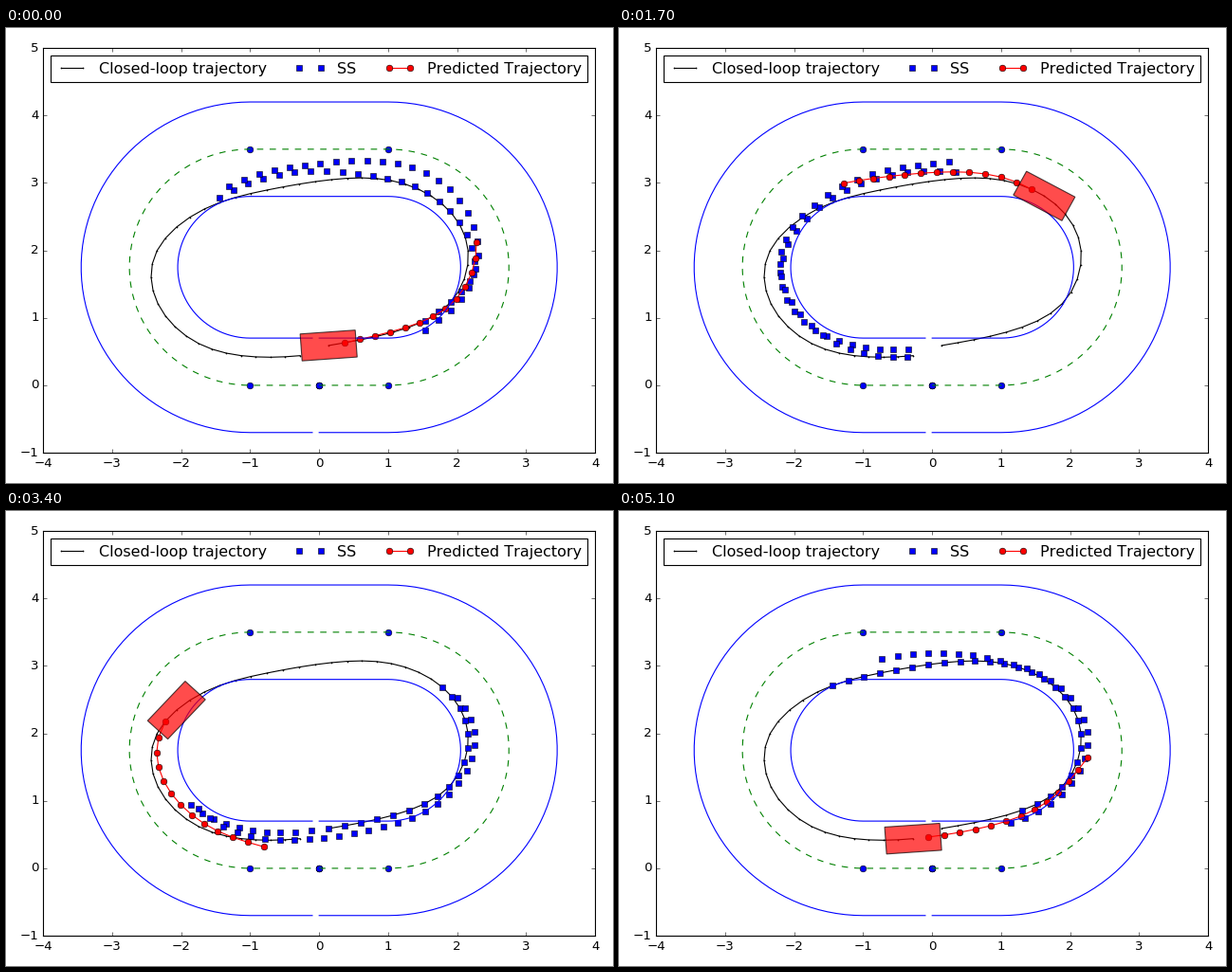
A matplotlib script that plays this animation: 640x480 px, repeating every 5.2 s.

```python
import numpy as np
import matplotlib.pyplot as plt
from matplotlib.animation import FuncAnimation
from matplotlib.patches import Polygon

plt.style.use("classic")
plt.rcParams.update({"savefig.dpi": "figure", "text.kerning_factor": 6})

W, H, DPI = 640, 480, 80
FRAMES, INTERVAL = 52, 100
WINDOW = 27      # safe-set points taken from each lap
HORIZON = 13     # predicted points
HALF_LENGTH, HALF_WIDTH = 0.4, 0.2


def spread(flat, step):
    """Natural cubic spline through stage points, `step` samples per span.

    Returns data coordinates as complex numbers x + iy.
    """
    x, y = np.reshape(flat, (-1, 2)).T
    z = (x - 330) / 72.75 + 1j * (377 - y) / 71.17
    n = len(z)
    system = 4 * np.eye(n) + np.eye(n, k=1) + np.eye(n, k=-1)
    system[0, 1] = system[-1, -2] = 0
    rhs = np.zeros(n, complex)
    rhs[1:-1] = 6 * np.diff(z, 2)
    bend = np.linalg.solve(system, rhs)
    t = np.arange((n - 1) * step + 1) / step
    i = np.minimum(t.astype(int), n - 2)
    f = t - i
    g = 1 - f
    return (g * z[i] + f * z[i + 1]
            + ((g**3 - g) * bend[i] + (f**3 - f) * bend[i + 1]) / 6)


def track(shift):
    """Oval track line, moved inwards by `shift`."""
    radius = 1.75 - shift
    turn = radius * np.exp(1j * np.linspace(-np.pi / 2, np.pi / 2, 60))
    return np.concatenate([[1j * shift], 1 + 1.75j + turn,
                           -1 + 1.75j - turn, [-0.1 + 1j * shift]])


# Driven path, continued by one horizon past the finish line
path = spread([340, 335, 408, 321, 467, 291, 487, 235, 460, 186, 406, 161,
               343, 160, 275, 171, 209, 191, 159, 235, 160, 291, 203, 333,
               263, 347, 326, 344, 392, 332, 451, 307, 494, 260], 4)
course = np.unwrap(np.angle(np.gradient(path)))
along = np.exp(1j * course)

# Two earlier laps feed the safe set; the inner one runs on into the path
inner_lap = spread([442, 319, 488, 274, 486, 218, 444, 174, 387, 156,
                    321, 151, 255, 164, 198, 201, 170, 258, 195, 310,
                    246, 334, 305, 339, 375, 329], 4)
inner_lap = np.concatenate([inner_lap[:46], path])
outer_lap = spread([442, 309, 495, 254, 478, 182, 413, 143, 331, 143,
                    251, 160, 183, 210, 175, 276, 229, 333, 304, 347,
                    382, 337, 455, 309, 494, 247, 466, 187, 402, 158,
                    326, 150, 243, 163], 5)

# Key steps, with values blended in between
KEYS = [0, 6, 17, 24, 30, 39, 51]
HEADING = np.radians([4.1, 38, 151.6, 182, 199.4, 293.4, 364])
INNER_LEAD = [0, 1, 1, 1, 2, 1, 0]
OUTER_LEAD = [0, 1, 2, 4, 4, 3, 1]
# Forecast drift halfway and at the horizon: real is ahead, imaginary is left
MID_DRIFT = [-.08, .16 + .05j, .1 - .12j, -.09, .36 + .2j, .04j, 0]
END_DRIFT = [-.12 - .13j, .22 - .05j, -.22j, .2j, .55 - .17j, .08 + .04j, 0]
slip = HEADING - course[KEYS]


def blend(step, values):
    return np.interp(step, KEYS, values)


def safe_set(step):
    parts = []
    for lap, lead in (inner_lap, INNER_LEAD), (outer_lap, OUTER_LEAD):
        first = step + int(round(blend(step, lead)))
        parts.append(lap[first:first + WINDOW])
    return np.concatenate(parts)


def prediction(step):
    ahead = slice(step + 1, step + 1 + HORIZON)
    u = np.linspace(0, 1, HORIZON)
    drift = (blend(step, MID_DRIFT) * 4 * u * (1 - u)
             + blend(step, END_DRIFT) * u * (2 * u - 1))
    return path[ahead] + drift * along[ahead]


def car_corners(step):
    angle = course[step] + blend(step, slip)
    a, b = HALF_LENGTH, HALF_WIDTH
    box = np.array([a + 1j * b, a - 1j * b, -a - 1j * b, -a + 1j * b])
    z = path[step] + box * np.exp(1j * angle)
    return np.column_stack([z.real, z.imag])


fig = plt.figure(figsize=(W / DPI, H / DPI), dpi=DPI, facecolor="w")
ax = fig.add_axes([39.2 / W, 31.9 / H, 582 / W, 427 / H])
ax.set_xlim(-4, 4)
ax.set_ylim(-1, 5)
ax.set_xticks(range(-4, 5))
ax.set_yticks(range(-1, 6))
ax.tick_params(axis="x", pad=4.6)

ax.plot([0, 1, 1, -1, -1, 0, 0], [0, 0, 3.5, 3.5, 0, 0, 0], "bo")
for shift, style in ((0, "g--"), (0.7, "b-"), (-0.7, "b-")):
    line = track(shift)
    ax.plot(line.real, line.imag, style)

driven = path[:FRAMES]
ax.plot(driven.real, driven.imag, "-ok", markersize=1, zorder=0.1,
        label="Closed-loop trajectory")
safe_dots, = ax.plot([], [], "sb", zorder=0.2, label="SS")
forecast_line, = ax.plot([], [], "-or", zorder=0.3,
                         label="Predicted Trajectory")
car = ax.add_patch(Polygon(car_corners(0), closed=True, fc="r", ec="k",
                           alpha=0.7, zorder=10))
legend = ax.legend(mode="expand", ncol=3, loc="upper right")
legend.set_zorder(20)


def update(step):
    for artist, z in ((safe_dots, safe_set(step)),
                      (forecast_line, prediction(step))):
        artist.set_data(z.real, z.imag)
    car.set_xy(car_corners(step))
    return safe_dots, forecast_line, car


anim = FuncAnimation(fig, update, frames=FRAMES, interval=INTERVAL,
                     repeat=True, repeat_delay=0)
plt.show()
```
